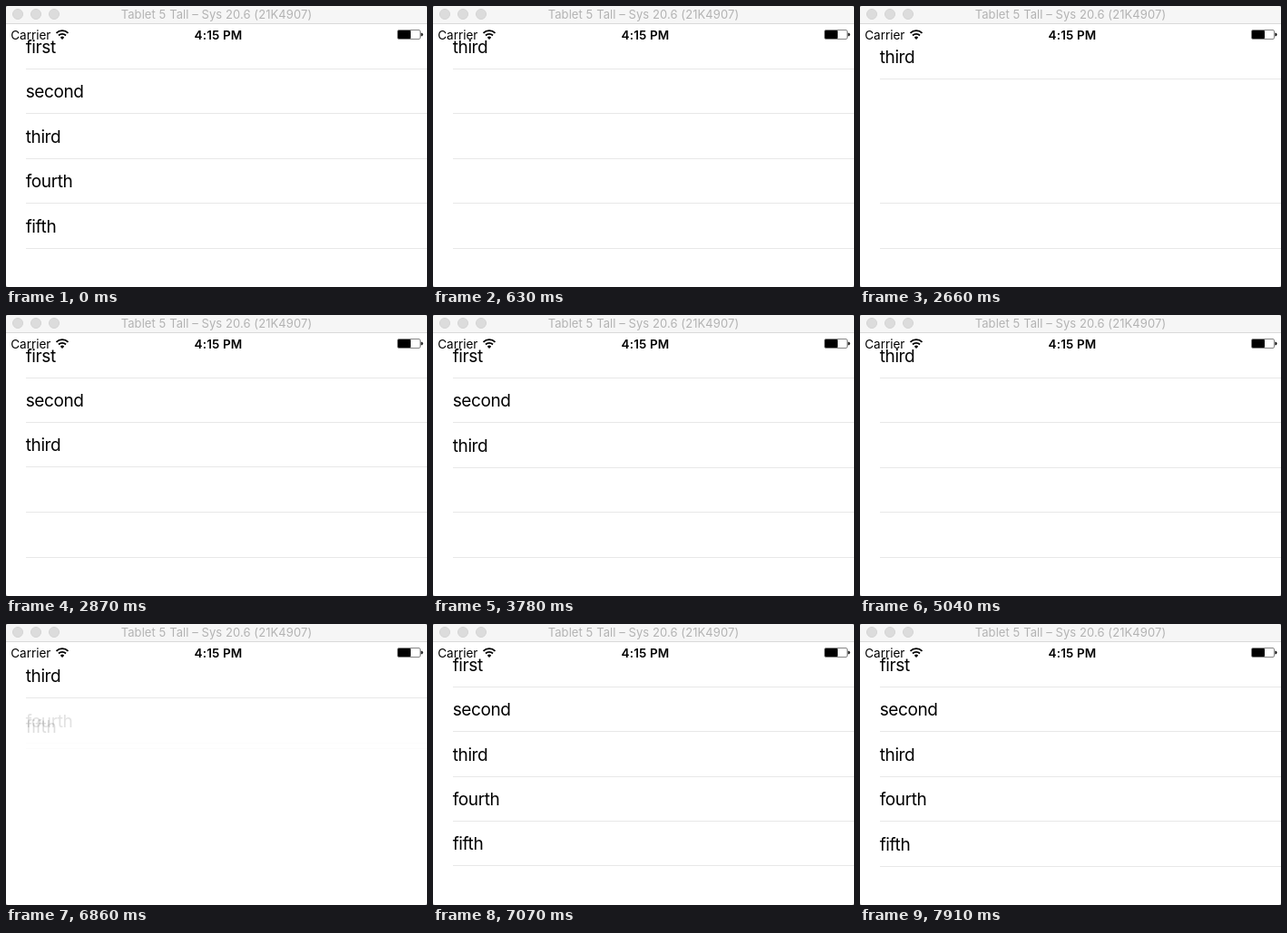
An HTML page that plays this animation: 464 px wide and 310 px high, repeating every 8 s.

```html
<!DOCTYPE html>
<html lang="en">
<head>
<meta charset="utf-8">
<title>Filtered list</title>
<style>
  html, body { margin: 0; width: 100%; height: 100%; overflow: hidden; background: #999; }
  #stage {
    position: relative; width: 464px; height: 310px; overflow: hidden;
    background: #fff; border-radius: 3px 3px 2px 2px;
    font-family: Inter, Roboto, sans-serif; color: #000; white-space: nowrap;
  }
  #stage > * { position: absolute; }
  .bar {
    left: 0; top: 0; width: 464px; height: 19px; z-index: 3;
    background: #f6f6f6; border-bottom: 1px solid #d9d9d9;
    font-size: 13px; line-height: 19px; letter-spacing: .08px;
    color: #b3b3b3; text-align: center;
  }
  .bar i {
    position: absolute; top: 3px; width: 10px; height: 10px;
    border: 1px solid #d4d4d4; border-radius: 50%; background: #dcdcdc;
  }
  .status { top: 23px; z-index: 3; font-size: 13.5px; line-height: 18px; }
  .carrier { left: 5.2px; }
  .time { left: 134px; width: 200px; text-align: center; font-weight: 600; letter-spacing: .15px; }
  .icons { left: 0; top: 0; z-index: 3; }
  .row, .rule { left: 0; top: 0; width: 464px; }
  .row {
    height: 49px; background: #fff; text-indent: 21.7px;
    font-size: 19px; line-height: 50px; letter-spacing: -.38px;
  }
  .row::after, .rule {
    content: ""; position: absolute; left: 22px; bottom: 0;
    width: 442px; height: 1px; background: #e8e8e8;
  }
  .rule { bottom: auto; }
</style>
</head>
<body>
<div id="stage">
  <div class="bar">
    <i style="left:7px"></i><i style="left:27px"></i><i style="left:47px"></i>
    Tablet 5 Tall – Sys 20.6 (21K4907)
  </div>
  <div class="status carrier">Carrier</div>
  <div class="status time">4:15 PM</div>
  <svg class="icons" width="464" height="40">
    <g fill="none" stroke="#000" stroke-width="1.8">
      <path d="M55.5 29.9A9.2 9.2 0 0 1 68.5 29.9"/>
      <path d="M58 32.5A5.7 5.7 0 0 1 66 32.5"/>
    </g>
    <path d="M62 37L59.8 34.7A3.1 3.1 0 0 1 64.2 34.7Z"/>
    <rect x="431.5" y="26.5" width="25" height="10" rx="1.5" fill="#fff" stroke="#666" stroke-width=".8"/>
    <rect x="432" y="27" width="14" height="9" rx=".8"/>
    <path d="M457.5 29.5a2 2 0 0 1 0 4z"/>
  </svg>
</div>
<script>
const LOOP = 8000, STEP = 70, DURATION = 290;
const words = ["first", "second", "third", "fourth", "fifth"];
const all = [0, 1, 2, 3, 4];
const changes = [
  { at: -DURATION, rows: all },
  { at: 340, rows: [2] },
  { at: 2591, rows: [0, 1, 2] },
  { at: 4690, rows: [2] },
  { at: 6789, rows: all }
];

const stage = document.getElementById("stage");
function add(className, text = "") {
  const el = document.createElement("div");
  el.className = className;
  el.textContent = text;
  return stage.appendChild(el);
}
const lineY = slot => Math.floor(69.25 + 49.5 * slot);
const rules = all.map(i => {
  const el = add("rule");
  el.style.top = lineY(i) + "px";
  return el;
});
const cells = words.map((word, i) => {
  const el = add("row", word);
  el.style.zIndex = i === 2 ? 2 : 1;
  return el;
});

// cubic-bezier(.42, 0, .58, 1)
function easeInOut(x) {
  if (x <= 0) return 0;
  if (x >= 1) return 1;
  let lo = 0, hi = 1, s = .5;
  for (let i = 0; i < 24; i++) {
    s = (lo + hi) / 2;
    const bx = 1.26 * (1 - s) ** 2 * s + 1.74 * (1 - s) * s * s + s ** 3;
    if (bx < x) lo = s; else hi = s;
  }
  return s * s * (3 - 2 * s);
}

// Hidden rows collapse onto the next free slot.
const slotOf = (row, rows) => rows.filter(r => r < row).length;
const mix = (a, b, p) => a + (b - a) * p;

function draw(t) {
  const n = changes.filter(c => c.at <= t).length - 1;
  const to = changes[n].rows;
  const from = changes[Math.max(0, n - 1)].rows;
  const p = easeInOut((t - changes[n].at) / DURATION);

  cells.forEach((el, row) => {
    const alpha = mix(+from.includes(row), +to.includes(row), p);
    const y = lineY(mix(slotOf(row, from), slotOf(row, to), p)) - 48;
    el.style.top = y + "px";
    el.style.opacity = alpha;
    el.style.visibility = alpha > 0 ? "visible" : "hidden";
  });
  rules.forEach((el, i) => {
    el.style.visibility = i >= to.length ? "visible" : "hidden";
  });
}

const start = performance.now();
function tick() {
  const t = (performance.now() - start) % LOOP;
  draw(Math.floor(t / STEP) * STEP);
  requestAnimationFrame(tick);
}
tick();
</script>
</body>
</html>
```
